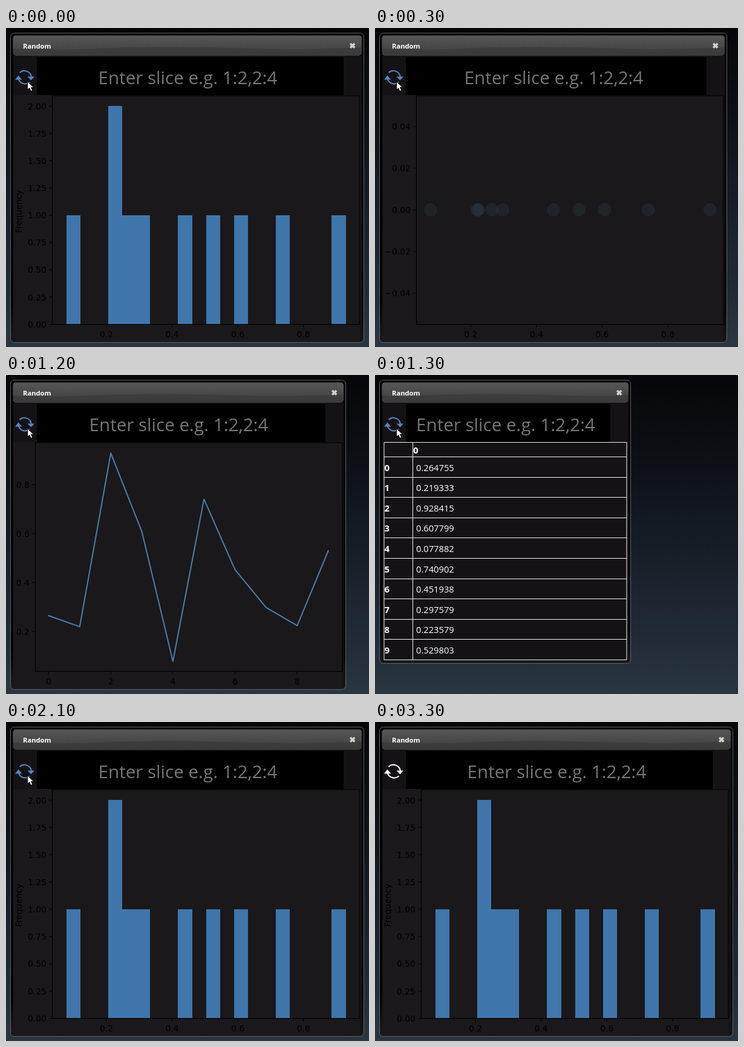
An HTML page for the animation above (3400 ms loop, 600 px wide and 528 px high).

```html
<!DOCTYPE html>
<html lang="en">
<head>
<meta charset="utf-8">
<title>Random</title>
<style>
  html, body { margin: 0; width: 100%; height: 100%; overflow: hidden; background: #000; }
  svg { display: block; width: 600px; height: 528px; }
  .ui { font-family: "Open Sans", "Noto Sans", sans-serif; }
  .bold { font-weight: 700; }
  .plot { font: 13.89px "DejaVu Sans", sans-serif; }
</style>
</head>
<body>
<svg id="stage" viewBox="0 0 600 528" xmlns="http://www.w3.org/2000/svg">
  <defs>
    <linearGradient id="page" x1="0" y1="0" x2="0" y2="1">
      <stop offset="0" stop-color="#050609"/>
      <stop offset=".25" stop-color="#0c0f14"/>
      <stop offset=".5" stop-color="#151b24"/>
      <stop offset=".78" stop-color="#1f2935"/>
      <stop offset="1" stop-color="#293540"/>
    </linearGradient>
    <linearGradient id="frame" x1="0" y1="0" x2="0" y2="1">
      <stop offset="0" stop-color="#000"/>
      <stop offset=".87" stop-color="#030303"/>
      <stop offset="1" stop-color="#1c1b1c"/>
    </linearGradient>
    <linearGradient id="bar" x1="0" y1="0" x2="0" y2="1">
      <stop offset="0" stop-color="#454445"/>
      <stop offset="1" stop-color="#3a393a"/>
    </linearGradient>
    <linearGradient id="gloss" x1="0" y1="0" x2="0" y2="1">
      <stop offset="0" stop-color="#585758"/>
      <stop offset="1" stop-color="#464546"/>
    </linearGradient>
  </defs>
  <rect width="600" height="528" fill="url(#page)"/>
</svg>
<script>
const NS = "http://www.w3.org/2000/svg";
const LOOP = 3400;
const CURSOR_LEAVES = 2700;
const BLUE = "#4076ac";
const values = [0.264755, 0.219333, 0.928415, 0.607799, 0.077882,
                0.740902, 0.451938, 0.297579, 0.223579, 0.529803];
const stage = document.getElementById("stage");

function add(parent, tag, attrs = {}, content = "") {
  const node = document.createElementNS(NS, tag);
  for (const key in attrs) node.setAttribute(key, attrs[key]);
  node.textContent = content;
  parent.appendChild(node);
  return node;
}

const rect = (parent, x, y, right, bottom, attrs) =>
  add(parent, "rect", { x, y, width: right - x, height: bottom - y, ...attrs });
const path = (parent, d, attrs) => add(parent, "path", { d, fill: "none", ...attrs });

function makeWindow(right, bottom) {
  const g = add(stage, "g", { class: "ui" });
  const barRight = right - 4;
  rect(g, 7.5, 8.5, right - 0.5, bottom - 0.5, { rx: 6, fill: "url(#frame)", stroke: "#626366" });
  rect(g, 12, 46, barRight, bottom - 4, { fill: "#141215" });

  rect(g, 11.5, 12.5, barRight, 46, { rx: 5, fill: "url(#bar)" });
  const mid = (12 + barRight) / 2;
  path(g, `M11.5 34V17.5Q11.5 12.5 16.5 12.5H${barRight - 5}Q${barRight} 12.5 ${barRight} 17.5V32
           Q${mid + 180} 37 ${mid + 70} 33T${mid - 150} 34Q60 37 11.5 34Z`, { fill: "url(#gloss)" });
  add(g, "text", { x: 28, y: 33.5, "font-size": 11.2, class: "bold", fill: "#fff" }, "Random");
  const cx = right - 19.3;
  path(g, `M${cx - 3.5} 25.7l7 7m0 -7l-7 7`, { stroke: "#cfcfcf", "stroke-width": 3.6 });

  const inputRight = right - 34;
  rect(g, 51, 48, inputRight, 111, { fill: "#000" });
  add(g, "text", { x: (51 + inputRight) / 2 - 4, y: 93, "font-size": 29.6,
    "text-anchor": "middle", fill: "#757575" }, "Enter slice e.g. 1:2,2:4");
  return g;
}

// Shared axes box; each tick is a pair of [position, label].
function makeChart(right, left, xTicks, yTicks) {
  const win = makeWindow(right, 521);
  rect(win, 12, 111, right - 7, 517, { fill: "#1a181a" });
  const g = add(win, "g", { class: "plot" });
  const marks = add(g, "g");
  rect(g, left, 112, left + 507.5, 490.5, { fill: "none", stroke: "#000", "stroke-width": 1.1 });
  for (const [x, label] of xTicks) {
    path(g, `M${x} 490.5v5`, { stroke: "#000", "stroke-width": 1.1 });
    add(g, "text", { x, y: 511.5, "text-anchor": "middle" }, label);
  }
  for (const [y, label] of yTicks) {
    path(g, `M${left} ${y}h-5`, { stroke: "#000", "stroke-width": 1.1 });
    add(g, "text", { x: left - 9.7, y: y + 5.2, "text-anchor": "end" }, label);
  }
  return { win, g, marks };
}

const valueX = origin => v => origin + (v - 0.2) * 543;
const valueTicks = place => [0.2, 0.4, 0.6, 0.8].map(v => [place(v), v.toFixed(1)]);

function makeHistogram() {
  const toX = valueX(166);
  const toY = n => 490.5 - n * 180.6;
  const yTicks = Array.from({ length: 9 }, (_, i) => [toY(i / 4), (i / 4).toFixed(2)]);
  const { win, g, marks } = makeChart(592, 76.5, valueTicks(toX), yTicks);
  add(g, "text", { transform: "translate(26 303.5) rotate(-90)", "text-anchor": "middle" }, "Frequency");

  const min = Math.min(...values), max = Math.max(...values), bins = 20;
  const counts = Array(bins).fill(0);
  for (const v of values) counts[Math.min(bins - 1, Math.floor((v - min) / (max - min) * bins))]++;
  const edge = i => toX(min + (max - min) * i / bins);
  counts.forEach((n, i) => {
    if (n) rect(marks, edge(i), toY(n), edge(i + 1), 490.5,
      { fill: BLUE, "shape-rendering": "crispEdges" });
  });
  return win;
}

function makeScatter() {
  const toX = valueX(158.2);
  const yTicks = [-0.04, -0.02, 0, 0.02, 0.04].map(v =>
    [301 - v * 3450, v.toFixed(2).replace("-", "\u2212")]);
  const { win, marks } = makeChart(582, 68.5, valueTicks(toX), yTicks);
  for (const v of values)
    add(marks, "circle", { cx: toX(v), cy: 301, r: 10.5, fill: "#4a86b8", stroke: "#4a86b8", opacity: 0.11 });
  return win;
}

function makeLine() {
  const toX = i => 70.5 + i * 51.35;
  const toY = v => 424.5 - (v - 0.2) * 405;
  const { win, marks } = makeChart(562, 48.5, [0, 2, 4, 6, 8].map(i => [toX(i), i]), valueTicks(toY));
  path(marks, "M" + values.map((v, i) => `${toX(i)} ${toY(v)}`).join("L"),
    { stroke: "#4d7dac", "stroke-width": 2, "stroke-linejoin": "round", "stroke-linecap": "square" });
  return win;
}

function makeTable() {
  const g = makeWindow(423, 478);
  const top = 135.5, step = 33.6;
  let grid = "M15 111.5H416V471.5H15ZM62.5 111.5V471.5";
  const cell = (x, y, text, cls = "") =>
    add(g, "text", { x, y, class: cls, fill: "#fff", "font-size": cls ? 15 : 14.7 }, text);
  cell(63, 129.5, 0, "bold");
  values.forEach((v, i) => {
    const y = top + i * step;
    grid += `M15 ${Math.floor(y) + 0.5}H416`;
    cell(15.5, y + 23, i, "bold");
    cell(68, y + 23, v.toFixed(6));
  });
  path(g, grid, { stroke: "#f4f4f4", "stroke-width": 1 });
  return g;
}

const histogram = makeHistogram();
const views = [[0, histogram], [200, makeScatter()], [800, makeLine()],
               [1300, makeTable()], [2100, histogram]];

const icon = add(stage, "g");
path(icon, "M22.5 74A11.7 11.7 0 0 1 42 81M39.5 89.5A11.7 11.7 0 0 1 20.5 84",
  { stroke: "currentColor", "stroke-width": 2 });
path(icon, "M15 85.5L20.5 78.5L26.5 85.5ZM35.5 80.5H47L41.5 86.5Z", { fill: "currentColor" });

const cursor = path(stage, "M35.5 88.5V102.3L38.7 99.3L41 104.6L43.8 103.4L41.5 98.3H45.7Z",
  { fill: "#fff", stroke: "#000", "stroke-width": 1 });

function render(time) {
  const t = time % LOOP;
  const active = views.filter(([start]) => t >= start).pop()[1];
  for (const [, view] of views) view.style.display = view === active ? "" : "none";
  const hovering = t < CURSOR_LEAVES;
  icon.style.color = hovering ? "#5585c0" : "#fff";
  cursor.style.display = hovering ? "" : "none";
}

const begin = performance.now();
function tick() {
  render(performance.now() - begin);
  requestAnimationFrame(tick);
}
tick();
</script>
</body>
</html>
```
